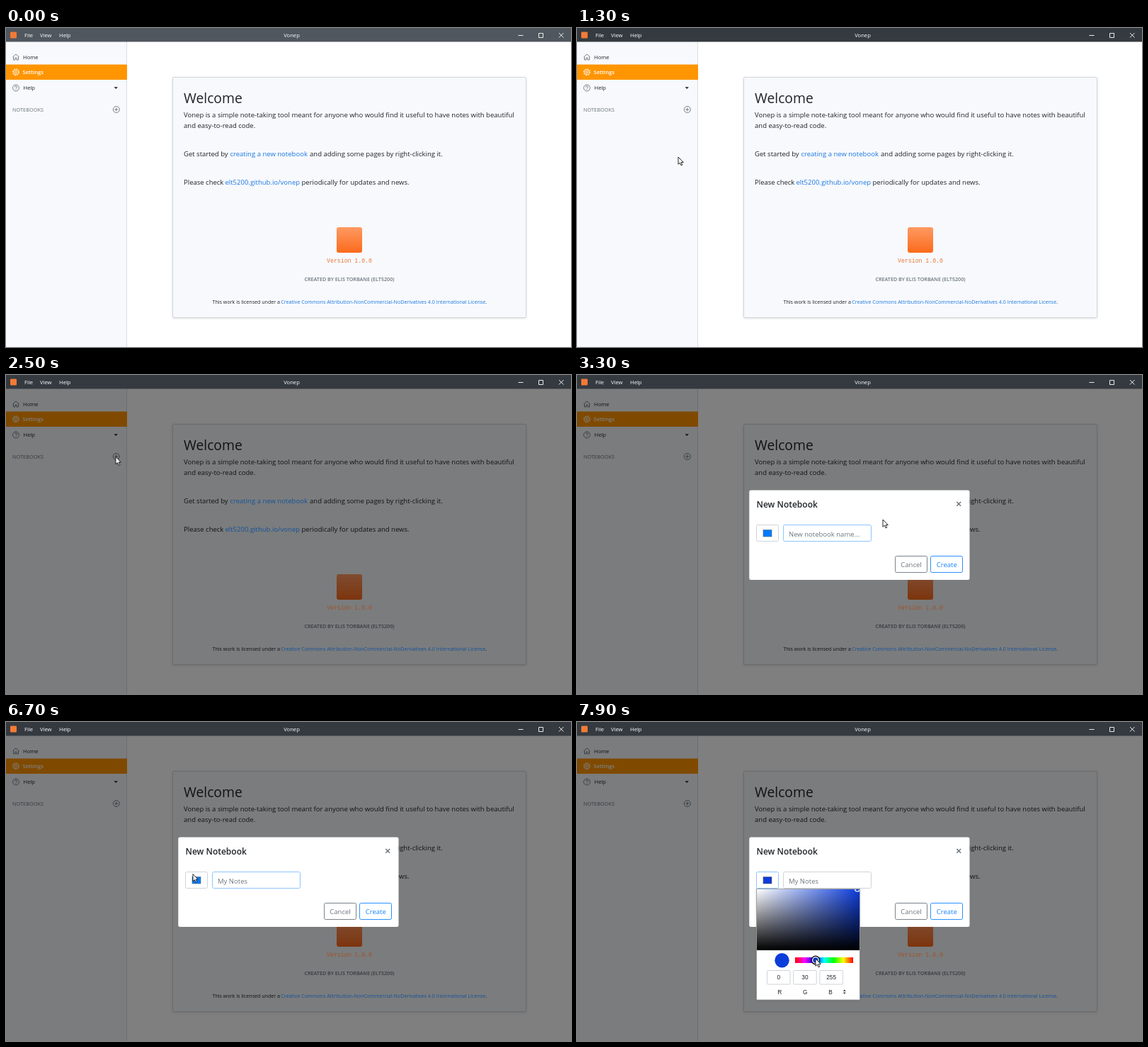
An HTML page that plays this animation: 798 by 450 pixels, repeating every 8 s.

```html
<!DOCTYPE html>
<html lang="en">
<head>
<meta charset="utf-8">
<title>Vonep</title>
<style>
html, body { margin: 0; width: 100%; height: 100%; overflow: hidden; background: #fff; }
svg { display: block; width: 798px; height: 450px; }
text { font: 9.53px "Open Sans", "Noto Sans", sans-serif; fill: #212529; white-space: pre; }
.s { font-size: 7.65px; font-weight: 500; }
.w { fill: #fff; }
.link { fill: #1c78e2; }
.b { font-weight: 600; }
.mid { text-anchor: middle; }
.grey { fill: #6c757d; }
.tiny { font-size: 7.13px; }
.mono { font: 8.2px "Liberation Mono", monospace; fill: #e8783c; }
.num { font: 8.3px "Liberation Sans", sans-serif; text-anchor: middle; }
.ln { fill: none; stroke: #6c757d; stroke-width: .9; }
.box { fill: #fff; stroke: #ced4da; }
</style>
</head>
<body>
<svg viewBox="0 0 798 450">
  <defs>
    <linearGradient id="white"><stop stop-color="#fff"/><stop offset="1" stop-color="#fff" stop-opacity="0"/></linearGradient>
    <linearGradient id="black" x2="0" y2="1"><stop stop-opacity="0"/><stop offset="1"/></linearGradient>
    <linearGradient id="hues"></linearGradient>
    <linearGradient id="orange" x2="0" y2="1"><stop stop-color="#ff9a62"/><stop offset="1" stop-color="#fb6a1c"/></linearGradient>
    <filter id="shade" x="-10%" y="-10%" width="120%" height="120%"><feDropShadow dx="0" dy="1" stdDeviation="1.5" flood-opacity=".13"/></filter>
    <clipPath id="area"><path d="M254 236h145v86h-145z"/></clipPath>
  </defs>

  <path fill="#fff" d="M0 0h798v450H0z"/>
  <path fill="#f7f9fc" d="M0 19h170v431H0z"/>
  <path stroke="#dadee2" d="M170.500 19v431"/>

  <!-- sidebar -->
  <path class="ln" d="M9.500 41l4.500-4 4.500 4M10.500 40.500v4.500h2.500v-3h2v3h2.500v-4.500"/>
  <text class="s" x="24" y="43.700">Home</text>
  <path fill="#ff9500" d="M0 51.500h171v21.500H0z"/>
  <g style="stroke:#fff">
    <circle class="ln" cx="14" cy="62.300" r="3.600" style="stroke:inherit"/>
    <circle class="ln" cx="14" cy="62.300" r="4.600" style="stroke:inherit;stroke-dasharray:1.800"/>
    <circle class="ln" cx="14" cy="62.300" r="1.400" style="stroke:inherit"/>
  </g>
  <text class="s w b" x="23.500" y="65.400">Settings</text>
  <circle class="ln" cx="14" cy="84.500" r="4.500"/>
  <path class="ln" d="M12.500 83.500q0-1.500 1.500-1.500t1.500 1.300-1.500 1.800M14 86v1"/>
  <text class="s" x="24.500" y="87.400">Help</text>
  <path fill="#212529" d="M152.500 83.200h5.400l-2.700 2.900z"/>
  <text class="grey" x="9" y="118" style="font-size:7.35px">NOTEBOOKS</text>
  <circle class="ln" cx="155.800" cy="115" r="4.500"/>
  <path class="ln" d="M153.300 115h5M155.800 112.500v5"/>

  <!-- welcome card -->
  <rect x="235.500" y="69.500" width="499" height="339" rx="1.500" fill="#f7f9fc" stroke="#d3d8dc" filter="url(#shade)"/>
  <text x="251" y="105.500" style="font-size:19.300px;font-weight:500">Welcome</text>
  <text x="251" y="125.500">Vonep is a simple note-taking tool meant for anyone who would find it useful to have notes with beautiful</text>
  <text x="251" y="140.500">and easy-to-read code.</text>
  <text x="251" y="180.500">Get started by</text>
  <text x="429" y="180.500">and adding some pages by right-clicking it.</text>
  <text x="251" y="220.500">Please check</text>
  <text x="417.500" y="220.500">periodically for updates and news.</text>
  <rect x="467" y="281" width="36" height="36" rx="3" fill="url(#orange)"/>
  <text class="mid b grey" x="485" y="356.800" style="font-size:7.200px">CREATED BY ELIS TORBANE (ELT5200)</text>
  <text class="tiny" x="291.500" y="389.300">This work is licensed under a</text>

  <path id="veil" d="M0 19h798v431H0z"/>

  <!-- coloured text, darkened less than the page -->
  <g id="vivid">
    <text class="link" x="316.500" y="180.500">creating a new notebook</text>
    <text class="link" x="309.500" y="220.500">elt5200.github.io/vonep</text>
    <text class="mono mid" x="485" y="331">Version 1.0.0</text>
    <text class="link tiny" x="388.300" y="389.300">Creative Commons Attribution-NonCommercial-NoDerivatives 4.0 International License<tspan fill="#212529">.</tspan></text>
  </g>

  <!-- title bar -->
  <path id="bar" d="M0 0h798v19.500H0z"/>
  <rect x="6" y="5.500" width="9" height="9" rx="1" fill="#f47a35"/>
  <text class="s w" x="26" y="13">File</text>
  <text class="s w" x="48" y="13">View</text>
  <text class="s w" x="75" y="13">Help</text>
  <text class="s w mid" x="403.500" y="13">Vonep</text>
  <path class="ln" style="stroke:#fff" d="M723.500 10.500h7M752.500 7.500h6v6h-6zM781 7l6.500 6.500M787.500 7l-6.500 6.500"/>

  <!-- dialog -->
  <g id="modal">
    <rect x="243.300" y="162.500" width="311.200" height="126.500" rx="2.500" fill="#fff"/>
    <text class="b" x="253.500" y="186.500" style="font-size:12px">New Notebook</text>
    <path class="ln" style="stroke-width:1.500" d="M536.300 179l5.800 5.800M542.100 179l-5.800 5.800"/>
    <rect class="box" id="pick" x="253.500" y="211.500" width="31" height="23" rx="2"/>
    <rect id="swatch" x="263" y="218.500" width="12" height="9.500" stroke="#555" stroke-width=".5"/>
    <rect class="box" id="field" x="291.500" y="211.500" width="124" height="23" rx="2"/>
    <text class="grey" id="name" x="299" y="227.500"></text>
    <path id="caret" stroke="#333" stroke-width=".9" d="M0 217v13"/>
    <rect class="ln" x="449.500" y="255.500" width="45" height="23" rx="2"/>
    <text class="mid grey" x="472" y="270.800">Cancel</text>
    <rect class="ln" x="499.500" y="255.500" width="45" height="23" rx="2" style="stroke:#1583ff"/>
    <text class="mid" x="522.300" y="270.800" style="fill:#1583ff">Create</text>
  </g>

  <!-- colour picker -->
  <g id="picker">
    <rect x="253.500" y="235.500" width="146" height="156.500" fill="#fff" stroke="#8a8d90" stroke-width=".8" filter="url(#shade)"/>
    <g clip-path="url(#area)">
      <path id="tone" d="M254 236h145v86h-145z"/>
      <path fill="url(#white)" d="M254 236h145v86h-145z"/>
      <path fill="url(#black)" d="M254 236h145v86h-145z"/>
      <circle cx="396" cy="235.500" r="3.500" fill="none" stroke="#fff" stroke-width="1.200"/>
    </g>
    <circle id="dot" cx="289.500" cy="336.300" r="10.200"/>
    <path fill="url(#hues)" d="M308 332h82v8h-82z"/>
    <g id="knob">
      <circle r="5.300" cy="336" fill="none" stroke="#111" stroke-width="2.400"/>
      <circle r="4.300" cy="336" stroke="#fff" stroke-width="1.200"/>
    </g>
    <g id="channels"></g>
    <path fill="#333" d="M375.800 379.800l2-2.300 2 2.300zM375.800 381.400l2 2.300 2-2.300z"/>
  </g>

  <path id="cursor" fill="#fff" stroke="#111" stroke-width=".9" stroke-linejoin="round" d="M0 0v10.300l2.400-2.200 1.700 3.800 1.700-.8-1.700-3.600h3.200z"/>
</svg>

<script>
const LOOP = 8000;
const $ = id => document.getElementById(id);
const set = (id, attrs) => { for (const k in attrs) $(id).setAttribute(k, attrs[k]); };
const show = (id, on) => set(id, { visibility: on ? "visible" : "hidden" });
const ramp = (t, a, b) => Math.min(1, Math.max(0, (t - a) / (b - a)));
const ease = p => p * p * (3 - 2 * p);

// Pointer stops: time, x, y
const path = [
  [50, 800, 330], [1050, 146, 186], [1300, 143, 182], [2050, 143, 182],
  [2380, 155, 115.5], [2520, 155, 115.5], [2950, 620, 221], [3300, 432, 204],
  [3900, 437, 206], [6250, 437, 206], [6650, 264, 214.5], [7050, 264, 214.5],
  [7500, 342, 334], [7600, 342, 334], [7900, 337, 334]
];
const NAME = "My Notes";
const keys = [4300, 4600, 4900, 5200, 5350, 5500, 5700, 5850];
const FOCUS = 2750, BLUR = 6900;

$("hues").innerHTML = [0, 300, 240, 180, 120, 60, 0]
  .map((h, i) => `<stop offset="${i / 6}" stop-color="hsl(${h} 100% 50%)"/>`).join("");
$("channels").innerHTML = [..."RGB"].map((c, i) => {
  const x = 268.5 + 37.2 * i;
  return `<rect class="box" x="${x}" y="350.500" width="32.500" height="19.500" rx="1"/>
    <text class="num" id="v${c}" x="${x + 16.2}" y="363.300"></text>
    <text class="num" x="${286.3 + 35.9 * i}" y="383.500">${c}</text>`;
}).join("");

function pointer(t) {
  const last = path[path.length - 1];
  if (t >= last[0]) return last.slice(1);
  const i = Math.max(1, path.findIndex(k => k[0] > t));
  const [a, x, y] = path[i - 1], [b, u, v] = path[i];
  const p = ease(ramp(t, a, b));
  return [x + (u - x) * p, y + (v - y) * p];
}

function draw(t) {
  const focus = ramp(t, 1050, 1150);
  const barTone = [80, 87, 94].map((v, i) => v + ([52, 58, 64][i] - v) * focus);
  set("bar", { fill: `rgb(${barTone})` });

  const veil = ramp(t, 2370, 2490);
  set("veil", { opacity: veil * .5 });
  $("vivid").style.filter = `brightness(${1 - .32 * veil})`;

  const slide = ramp(t, 2520, 2820);
  set("modal", { opacity: slide, transform: `translate(0 ${-31 * (1 - slide) ** 2})` });

  // typed name and blinking caret
  const typed = keys.filter(k => k <= t).length;
  $("name").textContent = typed ? NAME.slice(0, typed) : "New notebook name...";
  const since = t - (typed ? keys[typed - 1] : FOCUS);
  show("caret", t >= FOCUS && t < BLUR && since % 1060 < 530);
  const end = typed ? $("name").getComputedTextLength() : 0;
  set("caret", { transform: `translate(${299.5 + end} 0)` });

  const open = t >= BLUR;
  $("field").style.stroke = open ? "#ced4da" : "#8fc4fb";
  $("pick").style.stroke = open ? "#8fc4fb" : "#ced4da";

  // hue drag
  const drag = ease(ramp(t, 7600, 7900));
  const hue = 211 + 22 * drag;
  const green = Math.round(255 * (240 - hue) / 60);
  const tone = `rgb(${12 * drag} ${green + 30 * drag} ${255 - 37 * drag})`;
  for (const id of ["swatch", "tone", "dot", "knob"]) set(id, { fill: tone });
  set("knob", { transform: `translate(${308 + 82 * (360 - hue) / 360} 0)` });
  $("vR").textContent = 0;
  $("vG").textContent = green;
  $("vB").textContent = 255;
  show("picker", t >= BLUR + 50);

  const [x, y] = pointer(t);
  set("cursor", { transform: `translate(${x} ${y})` });
  show("cursor", t >= path[0][0]);
}

const start = performance.now();
function tick() {
  draw((performance.now() - start) % LOOP);
  requestAnimationFrame(tick);
}
tick();
</script>
</body>
</html>
```
